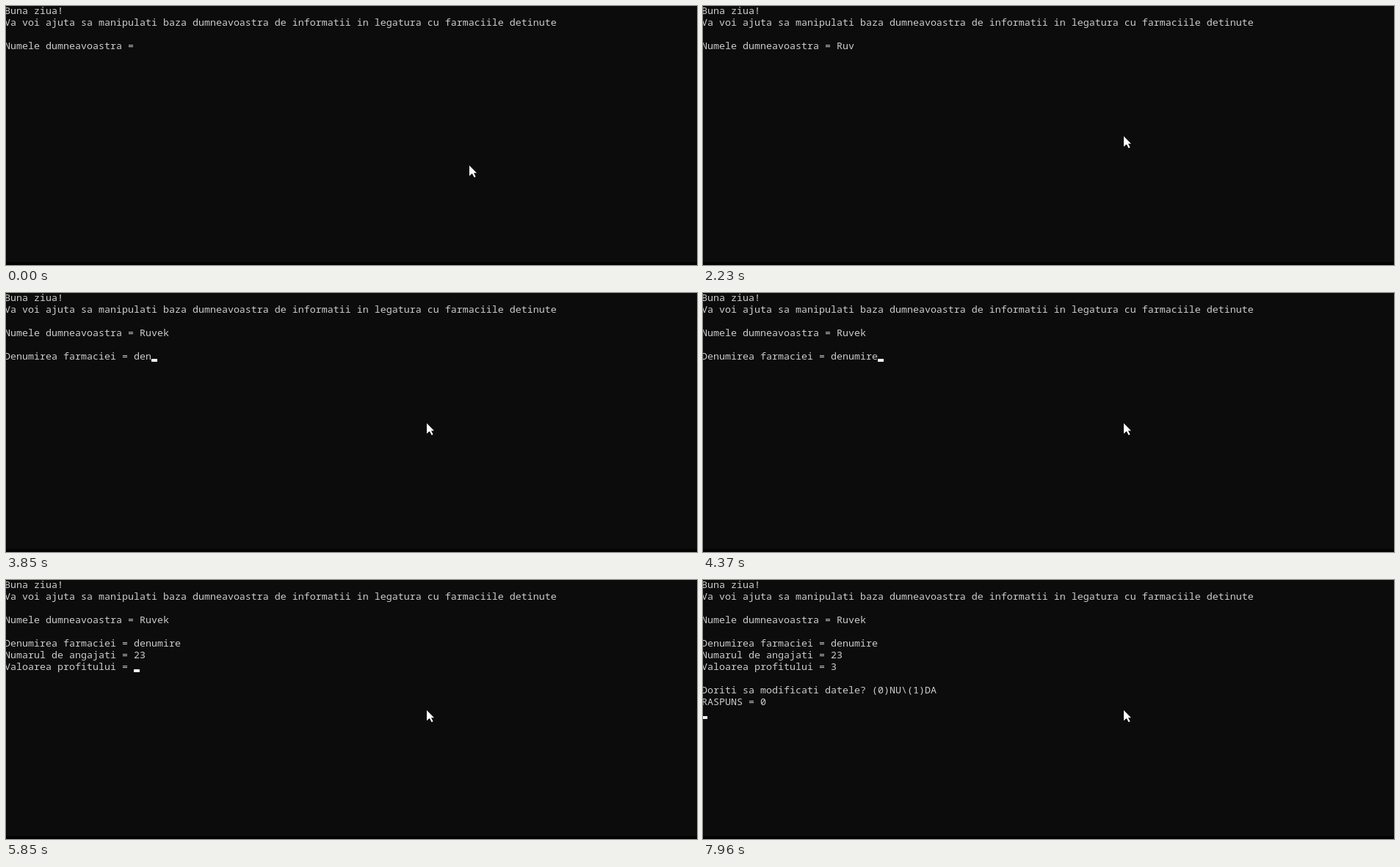
An HTML page that plays this animation: 941 px wide and 354 px high, repeating every 8 s.

```html
<!DOCTYPE html>
<html lang="ro">
<head>
<meta charset="utf-8">
<title>Console</title>
<style>
  html, body { margin: 0; width: 100%; height: 100%; overflow: hidden; background: #0c0c0c; }
  #stage { position: relative; width: 941px; height: 354px; overflow: hidden; background: #0c0c0c; }
  #text {
    position: absolute; left: -2px; top: -2px; margin: 0; white-space: pre;
    font: 13.3333px/16px "Noto Sans Mono", "DejaVu Sans Mono", monospace;
    font-variant-ligatures: none; color: #ccc;
  }
  #caret { position: absolute; left: -2px; top: 10px; width: 8px; height: 4px; background: #f2f2f2; }
  #edge { position: absolute; left: 0; bottom: 0; width: 100%; height: 4px; background: #030303; }
  #pointer { position: absolute; left: 0; top: 0; width: 12px; height: 18px; overflow: visible; }
</style>
</head>
<body>
<div id="stage">
  <pre id="text"></pre>
  <div id="caret"></div>
  <div id="edge"></div>
  <svg id="pointer" viewBox="0 0 12 18">
    <path d="M0 0L10 10.3H6L8.6 15.2L6.6 16.2L4 11.2L3 11.4L0 14.2Z" fill="#fff"/>
  </svg>
</div>
<script>
const LOOP = 8000, CELL_W = 8, CELL_H = 16;
const $ = id => document.getElementById(id);
const text = $('text'), caret = $('caret'), pointer = $('pointer');

// [time, text appended to the console, caret visible]
const typing = [
  [0, 'Buna ziua!\nVa voi ajuta sa manipulati baza dumneavoastra de informatii' +
      ' in legatura cu farmaciile detinute\n\nNumele dumneavoastra = ', 0],
  [620, '', 1], [820, '', 0], [1160, '', 1],
  [1510, 'R', 1], [1600, 'u', 1], [1700, '', 0], [1840, 'v', 1], [2230, '', 0],
  [2630, 'e', 1], [2760, 'k', 1],
  [3300, '\n\nDenumirea farmaciei = ', 1],
  [3640, 'd', 1], [3710, 'e', 1], [3850, 'n', 1], [3910, 'u', 1],
  [4120, 'm', 1], [4200, 'i', 1], [4290, 'r', 1], [4370, 'e', 1],
  [4650, '\nNumarul de angajati = ', 1], [5400, '', 0],
  [5600, '2', 1], [5720, '3', 1],
  [5850, '\nValoarea profitului = ', 1], [6460, '', 0],
  [6600, '3', 1],
  [6670, '\n\nDoriti sa modificati datele? (0)NU\\(1)DA\nRASPUNS = ', 1], [7550, '', 0],
  [7880, '0', 1], [7960, '\n', 1]
];

// [time, x, y] of the pointer tip
const moves = [[0, 631, 218], [70, 611, 203], [130, 586, 186], [200, 573, 178]];

let shown = '';
const screens = typing.map(([time, added, on]) => [time, shown += added, on]);

const at = (steps, t) => steps.findLast(step => step[0] <= t);

function draw(t) {
  const [, content, on] = at(screens, t);
  if (text.textContent !== content) text.textContent = content;
  const lines = content.split('\n');
  const col = lines[lines.length - 1].length, row = lines.length - 1;
  caret.style.transform = `translate(${col * CELL_W}px, ${row * CELL_H}px)`;
  caret.style.visibility = on ? 'visible' : 'hidden';
  const [, x, y] = at(moves, t);
  pointer.style.transform = `translate(${x}px, ${y}px)`;
}

const start = performance.now();
function tick() {
  draw((performance.now() - start) % LOOP);
  requestAnimationFrame(tick);
}
tick();
</script>
</body>
</html>
```
